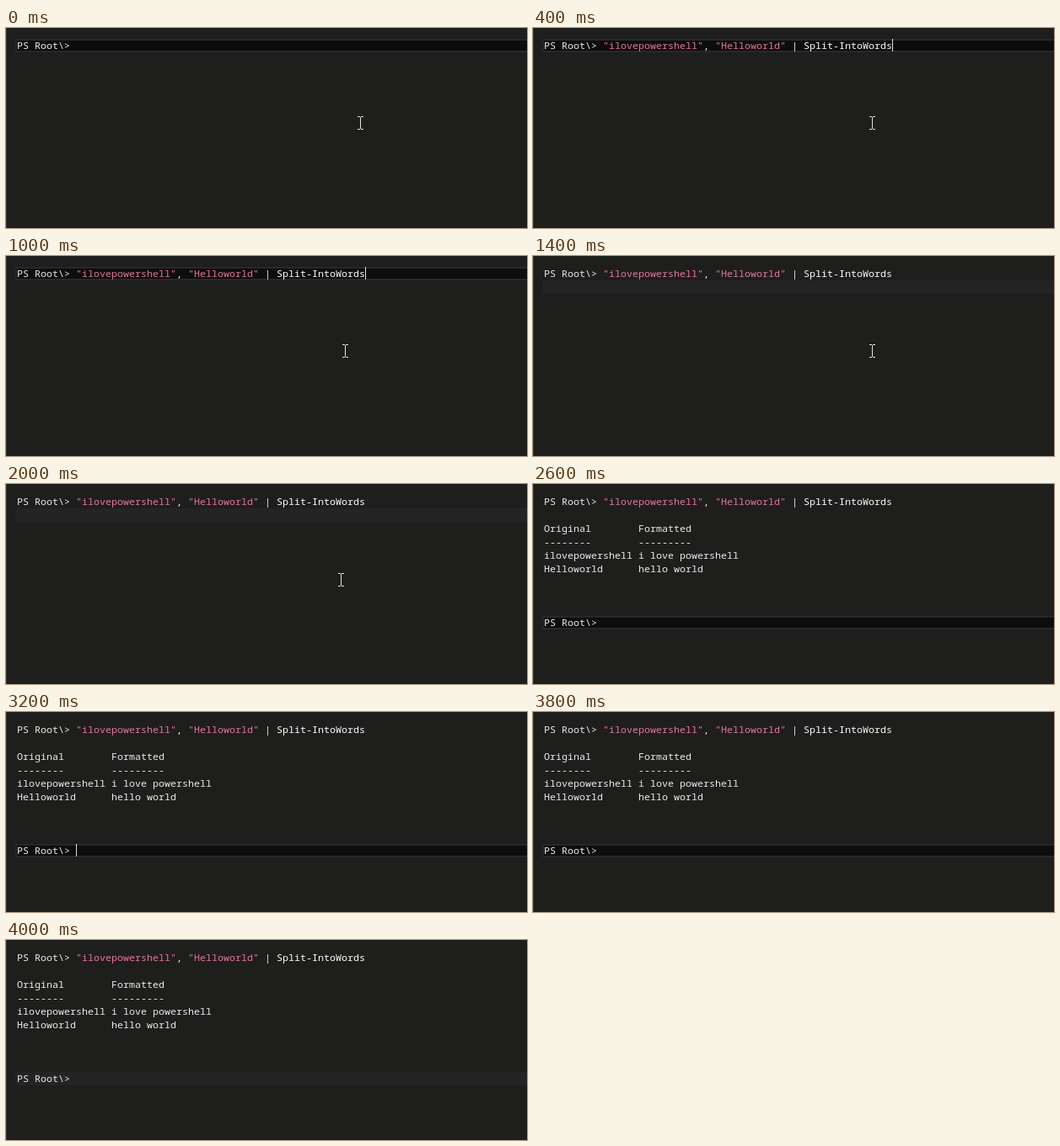
Write an HTML page with a canvas that moves like this. It is 618 px wide and 238 px high and loops after 4.2 s.

```html
<!DOCTYPE html>
<html lang="en">
<head>
<meta charset="utf-8">
<title>Splitting words in a terminal</title>
<style>
html, body { margin: 0; width: 100%; height: 100%; overflow: hidden; background: #1e1e1d; }
canvas { display: block; }
</style>
</head>
<body>
<canvas id="stage" width="618" height="238"></canvas>
<script>
const ctx = document.getElementById('stage').getContext('2d');
const LOOP = 4200, LEFT = 13, TOP = 13, COLUMN = 7, ROW = 16;
const PLAIN = '#ececec', STRING = '#e4769b', COMMAND = '#ffffff';

// Time, centre x and top y; null hides the mouse pointer.
const pointerStops = [
  [0, 420, 105], [200, 409, 105], [400, 402, 105], [1600, 400, 106],
  [1800, 397, 106], [2200, 395, 107], [2400, 343, 142], [2600, null, null]
];
const caretTimes = [[400, 600], [1000, 1400], [2200, 2600], [3200, 3600]];

function rect(color, x, y, width, height) {
  ctx.fillStyle = color;
  ctx.fillRect(x, y, width, height);
}

function write(text, column, row, color = PLAIN) {
  ctx.fillStyle = color;
  ctx.fillText(text, LEFT + column * COLUMN, TOP + row * ROW + 12);
}

function drawBand(row, focused) {
  const y = TOP + row * ROW;
  rect(focused ? '#282828' : '#242424', 11, y, 607, ROW);
  if (focused) rect('#0d0d0d', 13, y + 2, 605, ROW - 4);
}

function drawCommand() {
  write('"ilovepowershell"', 10, 0, STRING);
  write(',', 27, 0);
  write('"Helloworld"', 29, 0, STRING);
  write('|', 42, 0);
  write('Split-IntoWords', 44, 0, COMMAND);
}

function drawTable() {
  [
    ['Original', 'Formatted'],
    ['--------', '---------'],
    ['ilovepowershell', 'i love powershell'],
    ['Helloworld', 'hello world']
  ].forEach(([original, formatted], i) => {
    write(original, 0, i + 2);
    write(formatted, 16, i + 2);
  });
}

function drawPointer(x, y) {
  for (const edge of [y, y + 15]) {
    rect('#e4e4e4', x - 3, edge, 3, 1);
    rect('#e4e4e4', x + 1, edge, 3, 1);
  }
  rect('#e4e4e4', x, y + 1, 1, 14);
}

function draw(time) {
  const finished = time >= 2200;
  const running = time >= 1400 && !finished;
  const promptRow = finished ? 9 : 0;

  rect('#1e1e1d', 0, 0, 618, 238);
  rect('#363636', 0, 0, 1, 238);
  drawBand(running ? 1 : promptRow, !running && time < 4000);

  ctx.font = '500 11.667px "Noto Sans Mono", monospace';
  write('PS Root\\>', 0, 0);
  if (time >= 200) drawCommand();
  if (finished) {
    drawTable();
    write('PS Root\\>', 0, promptRow);
  }

  if (caretTimes.some(([from, to]) => time >= from && time < to)) {
    const column = finished ? 10 : 59;
    rect('#e0e0e0', LEFT + column * COLUMN, TOP + promptRow * ROW, 1, 15);
  }

  const [, x, y] = pointerStops.findLast(([start]) => start <= time);
  if (x !== null) drawPointer(x, y);
}

const start = performance.now();
function tick() {
  draw((performance.now() - start) % LOOP);
  requestAnimationFrame(tick);
}
tick();
</script>
</body>
</html>
```
